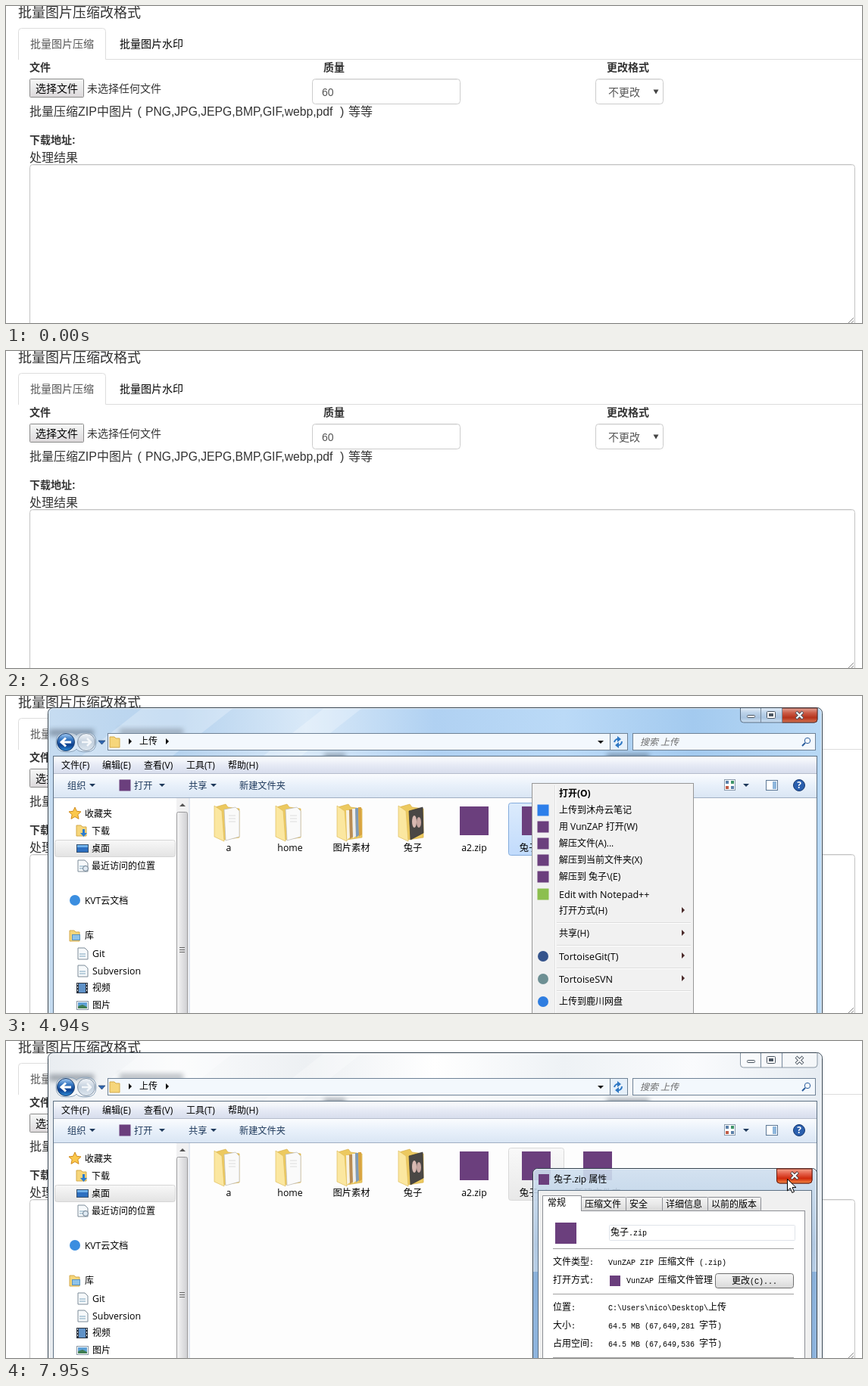
Animation, 1130 px wide and 419 px high, one loop 8000 ms. Source, as an HTML page:

```html
<!DOCTYPE html>
<html lang="zh-CN">
<head>
<meta charset="utf-8">
<title>批量图片压缩改格式</title>
<style>
html, body { margin: 0; width: 100%; height: 100%; overflow: hidden; background: #fff; }
svg { display: block; width: 1130px; height: 419px; }
text { font-family: "Open Sans", "Noto Sans CJK SC", sans-serif; white-space: pre; }
#page text { font-family: "Liberation Sans", "Noto Sans CJK SC", sans-serif; }
text.mono { font-family: "Liberation Mono", "Noto Sans CJK SC", monospace; }
</style>
</head>
<body>
<svg id="stage" viewBox="0 0 1130 419"></svg>
<script>
const LOOP = 8000, TICK = 77;
const RAR = '#6b3f7d';

// ---- drawing helpers (all return SVG markup) ----
const box = (x, y, x2, y2, fill, stroke, r = 0, more = '') => {
  const o = stroke ? .5 : 0;
  return `<rect x="${x + o}" y="${y + o}" width="${x2 - x - 2 * o}" height="${y2 - y - 2 * o}" rx="${r}" fill="${fill}" stroke="${stroke || 'none'}" ${more}/>`;
};
const path = (d, fill = 'none', stroke = 'none', w = 1, more = '') =>
  `<path d="${d}" fill="${fill}" stroke="${stroke}" stroke-width="${w}" ${more}/>`;
const dot = (x, y, r, fill, stroke = 'none') =>
  `<circle cx="${x}" cy="${y}" r="${r}" fill="${fill}" stroke="${stroke}"/>`;
// cy is the vertical middle of the glyphs
const text = (x, cy, s, size = 12, fill = '#000', more = '') =>
  `<text x="${x}" y="${cy + .37 * size}" font-size="${size}" fill="${fill}" ${more}>${s}</text>`;
const mono = (x, cy, s, more = '') =>
  text(x, cy, s.replace(/[ -~]+/g, m => `<tspan font-size="10">${m}</tspan>`), 12, '#000', 'class="mono" ' + more);
const group = (id, body, more = '') => `<g id="${id}" ${more}>${body}</g>`;
const grad = (id, dir, ...colors) =>
  `<linearGradient id="${id}" x2="${dir == 'h' ? 1 : 0}" y2="${dir == 'h' ? 0 : 1}">` +
  colors.map((c, i) => `<stop offset="${i / (colors.length - 1)}" stop-color="${c}"/>`).join('') + '</linearGradient>';
const down = (x, y, c = '#1e395b', w = 4) => path(`M${x - w} ${y - 2}h${2 * w}l${-w} ${w}z`, c);
const right = (x, y, c = '#000') => path(`M${x - 2} ${y - 4}v8l4 -4z`, c);
const square = (x, y, s, c) => box(x - s / 2, y - s / 2, x + s / 2, y + s / 2, c);
const cross = (x, y, r, c, w) => path(`M${x - r} ${y - r}l${2 * r} ${2 * r}m0 ${-2 * r}l${-2 * r} ${2 * r}`, 'none', c, w);

const defs = '<defs>' +
  grad('btn', 'v', '#f7f8f7', '#e9e9ea', '#dcd8da') +
  grad('panel', 'v', '#8ba1b9', '#7f97b1', '#768da8') +
  grad('glass', 'h', '#c6dcf1', '#b5d2ee', '#d9e9f8', '#b0d1f2', '#bbdaf7', '#a3caef', '#b9d9f5') +
  grad('idle', 'h', '#e9edf1', '#fafbfc', '#edf0f3', '#ffffff', '#eef2f5', '#fafbfd', '#e6ecf2') +
  grad('menubar', 'v', '#fcfdfe', '#e6eaf5', '#d6dcec') +
  grad('tools', 'v', '#fafcfe', '#e8f0fa', '#dae6f4') +
  grad('red', 'v', '#e3a395', '#cb5c47', '#b5321a', '#d67755') +
  grad('redHot', 'v', '#f5a48c', '#e4604a', '#d02a0c', '#f58b45') +
  grad('cap', 'v', '#dfebf7', '#bcd2e9', '#a9c4e0', '#cde0f2') +
  grad('sel', 'v', '#dcebfc', '#c1dbfc') +
  grad('selIdle', 'v', '#f9f9f9', '#e8e8e8') +
  grad('hover', 'v', '#fbfdff', '#ebf3fd') +
  grad('navSel', 'v', '#f8f8f8', '#e3e3e3') +
  grad('ball', 'v', '#a9cdf2', '#3a7ac4', '#0c3f8d', '#2f8fdc') +
  grad('grayBall', 'v', '#f4f7fa', '#c2cfdd', '#dfe8f0') +
  grad('thumb', 'h', '#f6f6f6', '#e2e2e4', '#cfcfd2') +
  grad('tab', 'v', '#f4f4f4', '#e9e9e9', '#d8d8d8') +
  grad('dlg', 'v', '#cfdfef', '#a9c3de', '#b9d0e8', '#b4cfea') +
  '<filter id="blur"><feGaussianBlur stdDeviation="3"/></filter></defs>';

// ---- web page ----
const page = group('page',
  text(16, 8, '批量图片压缩改格式', 18, '#333') +
  path('M16.5 71V33.5q0 -4 4 -4h107q4 0 4 4V70.5H1130', 'none', '#ddd') +
  text(32, 50, '批量图片压缩', 14, '#555') + text(150, 50, '批量图片水印', 14) +
  [[31, 81, '文件'], [419, 81, '质量'], [793, 81, '更改格式'], [31, 177, '下载地址:']]
    .map(([x, y, s]) => text(x, y, s, 14, '#333', 'font-weight="700"')).join('') +
  box(31, 96, 103, 121, 'url(#btn)', '#8a8a8a', 1) + text(39, 109, '选择文件', 14) +
  text(107, 109, '未选择任何文件', 14, '#333') +
  box(404, 96, 600, 130, '#fff', '#ccc', 4) + path('M407 97.5H597', 'none', '#eee') + text(417, 114, '60', 14, '#555') +
  box(778, 96, 868, 130, '#fff', '#ccc', 4) + path('M781 97.5H865', 'none', '#eee') + text(795, 114, '不更改', 14, '#555') +
  path('M854.5 110.5h7l-3.5 6z', '#444') +
  text(31, 139, '批量压缩ZIP中图片', 16, '#333') + text(173.5, 139, '(', 16, '#333') +
  text(184, 139, 'PNG,JPG,JEPG,BMP,GIF,webp,pdf', 15.7, '#333') + text(441, 139, ')', 16, '#333') + text(452, 139, '等等', 16, '#333') +
  text(31, 200, '处理结果', 16, '#333') +
  box(31, 209, 1121, 440, '#fff', '#c4c4c4', 4) + path('M34 210.5H1118', 'none', '#eaeaea') +
  path('M1112 419l7 -7M1116 419l3 -3', 'none', '#888'));

// ---- task list popup ----
const list = group('list',
  box(-10, 205, 106, 440, 'url(#panel)', '#43566c', 5) + box(-10, 206, 105, 440, 'none', '#a9bccf', 4) +
  path('M0 320L30 290L96 419H40Z', '#6a819d', 'none', 1, 'opacity=".35"') +
  group('row', box(-8, 0, 97, 33, '#ffffff30', '#b4c5d6', 3) +
    box(74, 9, 88, 23, '#b23a33', '#5d1715', 2) + box(75, 10, 87, 22, 'none', '#e7b0aa', 1) + cross(81, 16, 2.5, '#fff', 2)) +
  text(-3, 238, 'dev', 12.5, '#fff') + text(-5, 270, 'oduanmi', 12.5, '#fff') + text(-2, 366, 'cv', 12.5, '#fff'));

// ---- file window ----
const folder = (cx, inside) =>
  path(`M${cx - 18} 147l14 -4l3 4l15 2v38l-20 3z`, '#ecc95f', '#d8b04a', .7) + inside +
  path(`M${cx - 19} 145l10 7l3 40l-13 -6z`, '#fbe7a0', '#e0bd5e', .7);
const paper = cx => path(`M${cx - 6} 150l15 -3l5 5v34l-18 5z`, '#fafafa', '#bbb', .7) +
  path(`M${cx} 158h9M${cx} 162h9M${cx} 166h9`, 'none', '#dcdcdc');
const strips = cx => ['#f7f2e4', '#b98c55', '#eee', '#7f9bb8', '#d9a441']
  .map((c, i) => path(`M${cx - 7 + 4 * i} ${151 - i}h4l1 36l-4 3z`, c)).join('');
const photo = cx => path(`M${cx - 5} 152l18 -5l1 34l-17 9z`, '#4a4745', '#333', .7) +
  `<ellipse cx="${cx + 2}" cy="166" rx="3" ry="8" fill="#d9b9b2"/><ellipse cx="${cx + 8}" cy="167" rx="3" ry="7" fill="#c9a8a2"/>`;
const zip = cx => square(cx, 165, 38, RAR);
const names = ['a', 'home', '图片素材', '兔子', 'a2.zip', '兔子.zip', '新建文件夹'];
const inside = [paper, paper, strips, photo];
const tileX = i => 294 + 81.1 * i;
const files = names.map((s, i) => {
  const cx = Math.round(tileX(i));
  return (i < 4 ? folder(cx, inside[i](cx)) : zip(cx)) + text(cx, 200, s, 12.3, '#000', 'text-anchor="middle"');
}).join('') + text(781, 217, '(3).zip', 12.3, '#000', 'text-anchor="middle"');

const miniFolder = (x, y) => path(`M${x - 7} ${y - 7}h6l2 2h5v12h-13z`, '#f6d67b', '#d3a94a');
const sheet = (x, y) => path(`M${x - 6} ${y - 7}h9l4 4v11h-13z`, '#f6f9fb', '#7d8b98') + path(`M${x - 4} ${y + 1}h8M${x - 4} ${y + 4}h8`, 'none', '#7ba3bd');
const navIcons =
  path('M91 147l2.4 5.3l5.6 .6l-4.2 3.9l1.2 5.6l-5 -2.9l-5 2.9l1.2 -5.6l-4.2 -3.9l5.6 -.6z', '#fbc84c', '#d08a1c') +
  miniFolder(100, 178) + path('M104 176v5h3l-4.5 5l-4.5 -5h3v-5z', '#2a7cd0') +
  box(93, 196, 109, 207, '#2d6fc0', '#34506f') + box(94, 197, 108, 200, '#6fb1ea') +
  sheet(101, 224) + dot(105, 228, 3.5, '#dfeaf3', '#6b7d8d') +
  dot(91, 270, 7, '#3b8ee0') +
  miniFolder(91, 317) + box(87, 315, 98, 323, '#8ec3ea', '#5c93bd') +
  sheet(101, 340) + sheet(101, 363) +
  box(93, 379, 108, 393, '#2c3440') + box(96, 380, 105, 392, '#5f92c8') + path('M94.5 380v12M106.5 380v12', 'none', '#eee', 1, 'stroke-dasharray="2"') +
  box(93, 403, 109, 415, '#fff', '#8796a5') + box(95, 405, 107, 413, '#5ea0d6') + path('M95 413v-3l6 -2l6 3v2z', '#3f7d52');
const nav = [[104, 156, '收藏夹'], [113, 179, '下载'], [113, 202, '桌面'], [113, 225, '最近访问的位置'], [104, 271, 'KVT云文档'],
  [104, 317, '库'], [114, 340, 'Git', 12.4], [114, 363, 'Subversion', 12.4], [114, 386, '视频'], [114, 409, '图片']]
  .map(a => text(...a)).join('');
const twists = group('twists',
  [155, 317].map(y => path(`M73.5 ${y + 3}h5v-5z`, '#595959', '#333', .6)).join('') +
  [[74, 271], [84, 340], [84, 363], [84, 386], [84, 409]].map(([x, y]) => path(`M${x + .5} ${y - 4}v8l4 -4z`, '#fff', '#b5b5b5')).join(''));

const glyphs = c =>
  box(978, 25, 989, 29, '#fff', c, 1) + box(1004, 20, 1016, 30, '#fff', c, 1) + box(1007, 23, 1013, 27, c) +
  cross(1047.5, 25.5, 4.5, c, 4) + cross(1047.5, 25.5, 4, '#fff', 2.2);
const capShape = 'M969.5 16V31q0 4 4 4H1067q4 0 4 -4V16';
const smudge = [[57, 44, 116], [150, 43, 234], [420, 76, 448], [793, 76, 849]]
  .map(([x, y, x2]) => box(x, y, x2, y + 9, '#2f3b48')).join('');

const win = group('win',
  box(55, 15, 1078, 450, 'url(#glass)', '#33424f', 7, 'id="winGlass"') +
  group('smudge', smudge, 'filter="url(#blur)" opacity=".4"') +
  path('M180 16H300L220 79H100Z M420 16H470L390 79H340Z', '#fff', 'none', 1, 'opacity=".25"') +
  box(56, 16, 1077, 450, 'none', '#ffffffb0', 6) +
  group('capOn', path(capShape, 'url(#cap)', '#5c7086') + path('M1024.5 16V35H1067q4 0 4 -4V16z', 'url(#red)', '#5b2b25')) +
  group('capOff', path(capShape, '#ffffff90', '#8b98a5')) +
  path('M996.5 16V35M1024.5 16V35', 'none', '#76889b') + glyphs('#4a5561') +
  path('M66 61q0 -13 13 -13q12 0 14 4q2 -4 13 -4q13 0 13 13q0 13 -13 13q-11 0 -13 -4q-2 4 -14 4q-13 0 -13 -13z', '#ffffff60', '#8aa2ba') +
  dot(79, 61, 11.5, 'url(#ball)', '#1d3f6e') + path('M86 61H74M79 55.5l-6 5.5l6 5.5', 'none', '#fff', 3) +
  dot(106, 61, 11.5, 'url(#grayBall)', '#8495a8') + path('M100 61h11M107 56l5 5l-5 5', 'none', '#f4f7fa', 2.5) +
  path('M122 59h9l-4.5 5z', '#2f66b0', '#1d3d6b', .7) +
  box(134, 49, 798, 72, '#f3f8fd', '#6f8296') + box(797, 49, 821, 72, '#e6f0fa', '#6f8296') +
  miniFolder(144, 61) + right(164, 60) + text(176, 60, '上传') + right(213, 60) + down(785, 61, '#111') +
  path('M803 61a5 5 0 0 1 6 -4M813 60a5 5 0 0 1 -6 5', 'none', '#2f78c4', 2) + path('M807 53l5 4l-5 4zM809 61l-5 4l5 4z', '#2f78c4') +
  box(827, 49, 1069, 72, '#f3f8fd', '#6f8296') + text(837, 61, '搜索 上传', 12, '#6d6d6d', 'font-style="italic"') +
  dot(1058, 59, 3.7, 'none', '#2b5d9c') + path('M1055 62l-4 4', 'none', '#2b5d9c', 2) +
  box(62, 79, 1071, 450, '#fff', '#5e7184') +
  box(63, 80, 1070, 103, 'url(#menubar)') + box(63, 103, 1070, 134, 'url(#tools)') +
  path('M63 102.5H1070', 'none', '#b6bccc') + path('M63 134.5H1070', 'none', '#a0afc3') +
  [[73, '文件(F)'], [127, '编辑(E)'], [182, '查看(V)'], [238, '工具(T)'], [293, '帮助(H)']].map(([x, s]) => text(x, 92, s)).join('') +
  [[81, '组织'], [169, '打开'], [241, '共享'], [308, '新建文件夹']].map(([x, s]) => text(x, 118, s, 12.2, '#1e395b')).join('') +
  [114, 206, 274, 977].map(x => down(x, 118)).join('') + square(157, 118, 15, RAR) +
  box(948, 110, 963, 125, '#fff', '#8a9aac') + [[952, 114, '#5a7fa8'], [959, 114, '#3e9468'], [952, 121, '#bf5b45'], [959, 121, '#5a7fa8']].map(([x, y, c]) => square(x, y, 4, c)).join('') +
  box(1003, 111, 1019, 125, '#fff', '#5d7896') + box(1012, 113, 1017, 123, '#8fb7dc') +
  dot(1047, 118, 7.5, '#2a5fae', '#16386f') + text(1047, 118, '?', 12, '#fff', 'text-anchor="middle" font-weight="700"') +
  box(64, 190, 224, 213, 'url(#navSel)', '#d6d6d6', 3) + nav + navIcons + twists +
  box(225, 135, 241, 450, '#f1f1f2') + path('M229 146l4 -4l4 4z', '#555') +
  box(225, 153, 240, 460, 'url(#thumb)', '#9a9a9d', 2) + path('M229 332.5h7M229 335.5h7M229 338.5h7', 'none', '#666') +
  box(241, 135, 243, 450, '#e3e8f0') + box(243, 135, 1070, 450, '#fdfdfd') +
  box(663, 141, 737, 211, 'url(#sel)', '#84acdd', 3, 'id="picked"') +
  group('tileHover', box(0, 141, 74, 211, 'url(#hover)', '#b8d6fb', 3)) + files);

// ---- context menu: y, label, icon colour, submenu ----
const items = [[129, '打开(O)'], [151, '上传到沐舟云笔记', '#2d7fea'], [173, '用 VunZAP 打开(W)', RAR], [195, '解压文件(A)...', RAR],
  [217, '解压到当前文件夹(X)', RAR], [239, '解压到 兔子\\(E)', RAR], [262, 'Edit with Notepad++', '#8cbf4f'], [284, '打开方式(H)', 0, 1],
  [314, '共享(H)', 0, 1], [344, 'TortoiseGit(T)', '#35548c', 1], [374, 'TortoiseSVN', '#6d8f93', 1], [404, '上传到鹿川网盘', '#2f7de0']];
const menu = group('menu',
  box(694, 115, 908, 450, '#f1f1f1', '#979797') + path('M724.5 118V450', 'none', '#e0e0e0') + path('M725.5 118V450', 'none', '#fff') +
  group('menuHover', box(697, -11, 905, 11, '#dbe8f6', '#aecff7', 3)) +
  [299, 329, 359, 389].map(y => path(`M727 ${y + .5}H904`, 'none', '#dcdcdc') + path(`M727 ${y + 1.5}H904`, 'none', '#fff')).join('') +
  items.map(([y, s, icon, sub], i) =>
    text(730, y, s, /^[A-Z]/.test(s) ? 12.6 : 12, '#000', i ? '' : 'font-weight="700"') +
    (icon ? y > 330 ? dot(709, y, 7, icon) : square(709, y, 15, icon) : '') + (sub ? right(894, y - 1, '#4a2a2a') : '')).join(''));

// ---- properties dialog ----
const tabs = [[759, 818, '压缩文件'], [818, 866, '安全'], [866, 926, '详细信息'], [926, 996, '以前的版本']]
  .map(([x, x2, s]) => box(x, 206, x2 + 1, 225, 'url(#tab)', '#8c8e94', 1) + mono(x + 5, 216, s)).join('');
const rows = [[292, '文件类型:', 'VunZAP ZIP 压缩文件 (.zip)'], [316, '打开方式:', ''], [352, '位置:', 'C:\\Users\\nico\\Desktop\\上传'],
  [376, '大小:', '64.5 MB (67,649,281 字节)'], [400, '占用空间:', '64.5 MB (67,649,536 字节)']]
  .map(([y, a, b]) => mono(722, y, a) + mono(795, y, b)).join('');
const closeShape = 'M1017.5 169V184q0 4 4 4H1060q4 0 4 -4V169z';
const dialog = group('dialog',
  box(695, 168, 1071, 470, 'url(#dlg)', '#33424f', 6, 'fill-opacity=".9"') + box(696, 169, 1070, 470, 'none', '#ffffffa0', 5) +
  path('M696 305h7v160h-7zM1063 305h7v160h-7z', '#5d94cf', 'none', 1, 'opacity=".5"') +
  square(710, 183, 14, RAR) + text(723, 183, '兔子.zip 属性') +
  path(closeShape, 'url(#red)', '#5b2b25') + group('closeHot', path(closeShape, 'url(#redHot)', '#6b1d10')) +
  cross(1041, 178, 4.5, '#4a3a3a', 4) + cross(1041, 178, 4, '#fff', 2.3) +
  box(702, 197, 1064, 470, '#f0f0f0', '#5e7184') + box(708, 224, 1055, 470, '#fff', '#8c8e94') + tabs +
  path('M708.5 225V204.5H759.5V225', '#fff', '#8c8e94') + mono(715, 214, '常规') +
  square(739, 254, 28, RAR) + box(796, 243, 1042, 264, '#fff', '#dfe4ea', 1) +
  group('fieldHot', box(796, 243, 1042, 264, 'none', '#a9c9e6', 1)) + mono(798, 253, '兔子.zip') +
  path('M722 274.5H1040M722 334.5H1040M722 418.5H1040', 'none', '#a0a0a0') + rows +
  square(804, 317, 14, RAR) + mono(819, 316, 'VunZAP 压缩文件管理') +
  box(936, 307, 1040, 327, 'url(#tab)', '#707070', 3) + mono(988, 317, '更改(C)...', 'text-anchor="middle"'));

const pointer = group('pointer', path('M.5 .5V16l3.8 -3.5l2.5 6l2.7 -1.2l-2.5 -5.7h5z', '#fff', '#000'));

document.getElementById('stage').innerHTML = defs + page + list + win + menu + dialog + pointer;

// ---- motion ----
const $ = id => document.getElementById(id);
const set = (id, name, value) => $(id).setAttribute(name, value);
const show = (id, opacity) => set(id, 'opacity', Number(opacity));
const hold = (t, keys) => keys.reduce((v, [at, x]) => t >= at ? x : v, 0);

const route = [[2680, -14, 410], [3080, 91, 336], [3465, 104, 264], [3542, 130, 250], [3773, 655, 195], [4158, 694, 180],
  [4543, 694, 180], [4850, 735, 425], [6080, 738, 425], [6391, 748, 251], [6853, 791, 243], [7680, 1029, 177], [7790, 1029, 177], [7931, 1031, 182]];
function cursorAt(t) {
  const i = route.findIndex(k => k[0] > t);
  if (i < 1) return route[i ? route.length - 1 : 0].slice(1);
  const [t0, x0, y0] = route[i - 1], [t1, x1, y1] = route[i], k = (t - t0) / (t1 - t0);
  return [x0 + (x1 - x0) * k, y0 + (y1 - y0) * k].map(Math.round);
}

const small = [.532, .007, .03, .513, 4, 309.5], full = [1, 0, 0, 1, 0, 0];

function draw(t) {
  const [x, y] = cursorAt(Math.floor(t / TICK) * TICK);
  set('pointer', 'transform', `translate(${x} ${y})`);

  show('list', t >= 1460 && t < 2680);
  const rowY = hold(t, [[1840, 382], [1910, 350], [1980, 286], [2050, 254], [2280, 286], [2350, 350], [2430, 382]]);
  show('row', rowY > 0);
  set('row', 'transform', `translate(0 ${rowY})`);

  // restoring: 0 is the small tilted pose, 1 the full window
  const grow = hold(t, [[3000, -.25], [3080, 0], [3150, .55], [3230, .9], [3310, 1]]);
  set('win', 'transform', `matrix(${small.map((v, i) => v + (full[i] - v) * grow)})`);
  show('win', t >= 3000 ? .5 + .5 * grow : 0);
  show('twists', hold(t, [[3470, .5], [3550, 1], [4170, .5], [4320, 0]]));

  const active = t < 6250;
  set('winGlass', 'fill', active ? 'url(#glass)' : 'url(#idle)');
  show('capOn', active);
  show('capOff', !active);
  set('picked', 'fill', active ? 'url(#sel)' : 'url(#selIdle)');
  set('picked', 'stroke', active ? '#84acdd' : '#d9d9d9');

  const tile = names.findIndex((_, i) => Math.abs(x - tileX(i)) <= 37);
  show('tileHover', t > 3310 && t < 4550 && tile >= 0 && tile != 5 && y > 141 && y < 211);
  set('tileHover', 'transform', `translate(${Math.round(tileX(tile)) - 37} 0)`);

  show('menu', hold(t, [[4550, .6], [4630, 1], [5850, 0]]));
  const item = items.find(a => Math.abs(a[0] - y) <= 11);
  show('menuHover', !!item);
  if (item) set('menuHover', 'transform', `translate(0 ${item[0]})`);

  const zoom = hold(t, [[6250, .92], [6330, .96], [6410, .984], [6480, 1]]);
  set('dialog', 'transform', `translate(882.5 360) scale(${zoom || 1}) translate(-882.5 -360)`);
  show('dialog', hold(t, [[6250, .3], [6330, .6], [6410, .87], [6480, 1]]));
  show('closeHot', hold(t, [[7800, .4], [7870, .8], [7950, 1]]));
  show('fieldHot', hold(t, [[6930, 1], [7800, .5], [7870, 0]]));
}

const start = performance.now();
function frame() {
  draw((performance.now() - start) % LOOP);
  requestAnimationFrame(frame);
}
frame();
</script>
</body>
</html>
```
